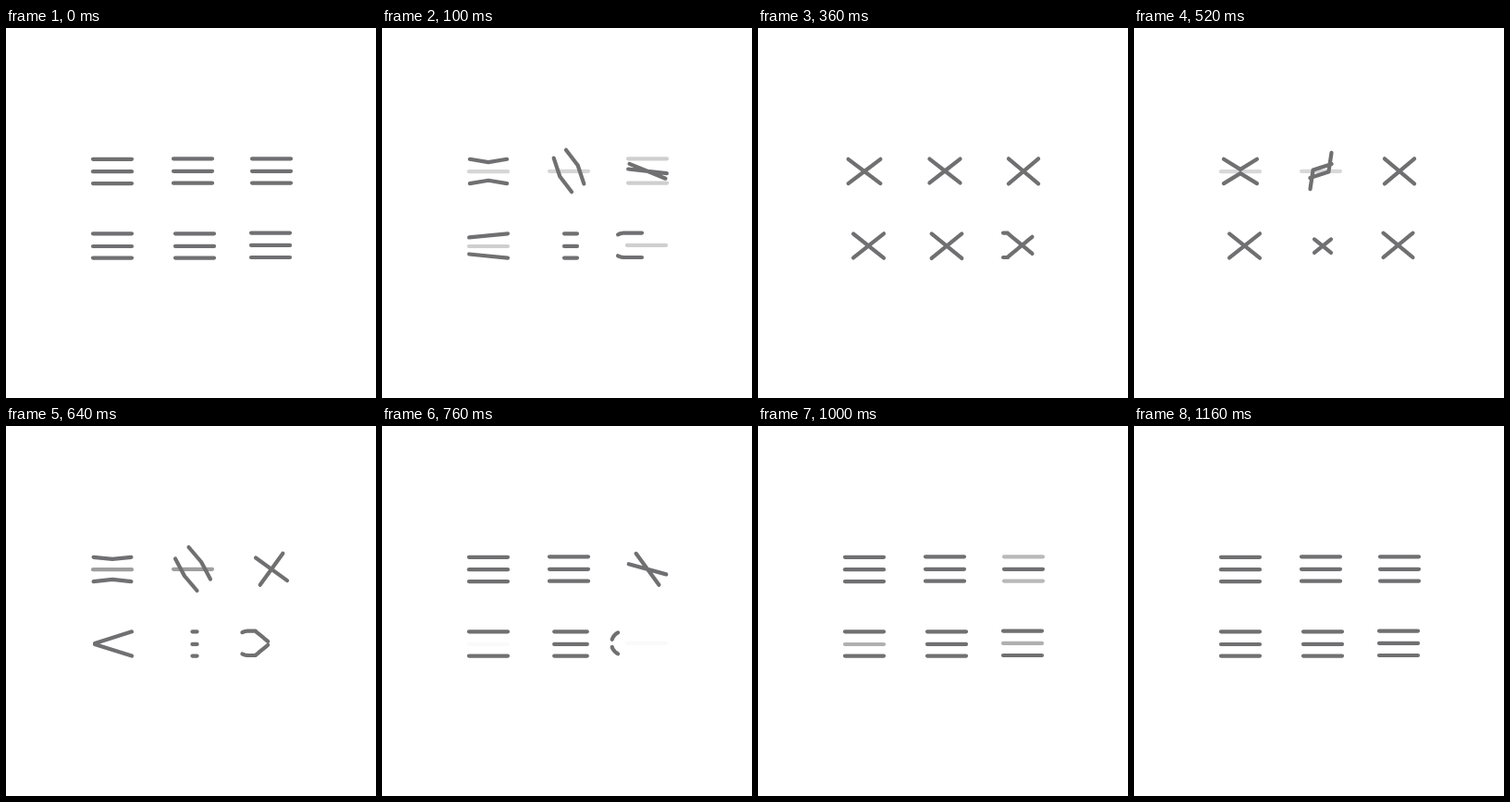
An HTML page for the animation above (1220 ms loop, 400 px wide and 400 px high).

```html
<!DOCTYPE html>
<html lang="en">
<head>
<meta charset="utf-8">
<title>Menu icons</title>
<style>
  html, body { margin: 0; width: 100%; height: 100%; overflow: hidden; background: #fff; }
  svg { display: block; width: 100vw; height: 100vh; }
  path { fill: none; stroke: #706f71; stroke-width: 4.2; stroke-linecap: round; stroke-linejoin: round; }
</style>
</head>
<body>
<svg id="stage" viewBox="0 0 400 400"></svg>
<script>
const LOOP = 1220, STEP = 20, ARM = 21;
const stage = document.getElementById('stage');
const rad = deg => deg * Math.PI / 180;
const mix = (a, b, p) => a + (b - a) * p;
const inOut = x => x < 0.5 ? 2 * x * x : 1 - 2 * (1 - x) ** 2;
const outCubic = x => 1 - (1 - x) ** 3;

// Fraction of a span that starts at `from` and takes `dur` ms.
const part = (t, from, dur) => Math.min(1, Math.max(0, (t - from) / dur));

// Goes 0 to 1 after `a`, and back to 0 after `b`.
const there = (t, a, b, dur, ease = x => x) =>
  t < b ? ease(part(t, a, dur)) : 1 - ease(part(t, b, dur));

// Piecewise linear value through [time, value] pairs.
function track(t, keys) {
  const i = keys.findIndex(k => k[0] > t);
  if (i < 0) return keys[keys.length - 1][1];
  if (i === 0) return keys[0][1];
  const [a, b] = [keys[i - 1], keys[i]];
  return mix(a[1], b[1], (t - a[0]) / (b[0] - a[0]));
}

const poly = pts => 'M' + pts.map(p => p[0].toFixed(2) + ' ' + p[1].toFixed(2)).join('L');
const bar = (cx, y, half = ARM) => poly([[cx - half, y], [cx + half, y]]);
const spoke = (cx, cy, deg, half) => {
  const dx = half * Math.cos(rad(deg)), dy = half * Math.sin(rad(deg));
  return poly([[cx - dx, cy - dy], [cx + dx, cy + dy]]);
};

// Fading in of a middle bar once the outer bars have settled.
const lateFade = t => t < 400 ? 1 - part(t, 0, 150)
  : track(t, [[745, 0], [1000, 0.55], [1085, 1]]);
const earlyFade = t => t < 400 ? 1 - part(t, 0, 140) : part(t, 440, 300);

// Outer bars fold towards the centre.
function fold(t) {
  const cx = 115, p = there(t, 0, 440, 280, inOut), dx = mix(ARM, 17.4, p);
  const half = (y, mid) => poly([[cx - dx, y], [cx, mix(y, mid, p)], [cx + dx, y]]);
  return { solid: half(141.8, 155) + half(168.1, 155), faint: bar(cx, 155.2), alpha: earlyFade(t) };
}

// Outer bars fold while making half a turn.
function twist(t) {
  const cx = 202, cy = 154.5;
  const p = there(t, 0, 440, 280, inOut);
  const turn = 180 * there(t, 0, 440, 290);
  const x = 11 * Math.sin(rad(turn));
  const y = -13.2 * (1 - p) + 4.3 * Math.sin(rad(turn));
  const spread = mix(90, 52, p);
  const tip = s => {
    const a = rad(90 + turn + s * spread);
    return [x + ARM * Math.cos(a), y + ARM * Math.sin(a)];
  };
  const pts = [tip(-1), [x, y], tip(1)];
  const side = s => poly(pts.map(q => [cx + s * q[0], cy + s * q[1]]));
  return { solid: side(1) + side(-1), faint: bar(cx, 154.8), alpha: earlyFade(t) };
}

// The middle bar splits into two spokes.
function split(t) {
  const cx = 287, cy = 154.8, p = there(t, 0, 560, 356, inOut);
  return {
    solid: spoke(cx, cy, 40 * p, ARM) + spoke(cx, cy, 140 * p, ARM),
    faint: bar(cx, 141.3) + bar(cx, 167.6),
    alpha: t < 500 ? 1 - part(t, 0, 150) : outCubic(part(t, 960, 200))
  };
}

// Outer bars swing about their right ends.
function swing(t) {
  const x = 136, p = t < 500 ? inOut(part(t, 0, 370)) : 1 - inOut(part(t, 520, 230));
  const a = rad(38.5 * p), dx = 42 * Math.cos(a), dy = 42 * Math.sin(a);
  return {
    solid: poly([[x, 222.3], [x - dx, 222.3 + dy]]) + poly([[x, 248.6], [x - dx, 248.6 - dy]]),
    faint: bar(115, 236), alpha: lateFade(t)
  };
}

// Bars shrink away, then a cross grows.
function shrink(t) {
  const cx = 204, cy = 235.7;
  const bars = t < 400 ? 1 - part(t, 0, 150) : part(t, 620, 165);
  const cross = t < 400 ? part(t, 150, 165) : 1 - part(t, 440, 178);
  let solid = '';
  if (bars > 0) solid = [222.3, 235.9, 248.6].map(y => bar(cx, y, ARM * bars)).join('');
  else if (cross > 0) solid = spoke(cx, cy, 39, ARM * cross) + spoke(cx, cy, -39, ARM * cross);
  return { solid, faint: '', alpha: 0 };
}

// Track for the looping bars: bar, half ring on the left, short run, diagonal.
function ringPoint(s) {
  const flat = 45, ring = 42.5, run = 8;
  if (s < flat) return [307 - s, -13.2];
  if (s < flat + ring) {
    const a = (s - flat) / ring * Math.PI;
    return [262 - 14 * Math.sin(a), -13.2 * Math.cos(a)];
  }
  s -= flat + ring;
  if (s < run) return [262 + s, 13.2];
  const d = (s - run) / 41;
  return [269.5 + 32 * d, 13.2 - 26.4 * d];
}

function ride(t) {
  const cy = 234.8;
  const u = t < 500 ? Math.min(t, 400) : 400 - Math.min(400, Math.max(0, t - 560));
  const head = track(u, [[0, 42], [200, 62], [360, 130], [400, 136.5]]);
  const tail = track(u, [[0, 0], [200, 52], [360, 90.5], [400, 95.5]]);
  const n = 40, pts = [];
  for (let i = 0; i <= n; i++) pts.push(ringPoint(mix(tail, head, i / n)));
  const side = s => poly(pts.map(q => [q[0], cy + s * q[1]]));
  return { solid: side(1) + side(-1), faint: bar(286, 234.9), alpha: lateFade(t) };
}

function addPath() {
  const el = document.createElementNS('http://www.w3.org/2000/svg', 'path');
  return stage.appendChild(el);
}

const icons = [fold, twist, split, swing, shrink, ride]
  .map(pose => ({ pose, faint: addPath(), solid: addPath() }));

function draw(t) {
  for (const icon of icons) {
    const now = icon.pose(t);
    icon.solid.setAttribute('d', now.solid);
    icon.faint.setAttribute('d', now.faint);
    icon.faint.setAttribute('opacity', now.alpha.toFixed(3));
  }
}

let start = null;
function tick(now) {
  if (start === null) start = now;
  const t = (now - start) % LOOP;
  draw(Math.floor(t / STEP) * STEP);
  requestAnimationFrame(tick);
}
draw(0);
requestAnimationFrame(tick);
</script>
</body>
</html>
```
